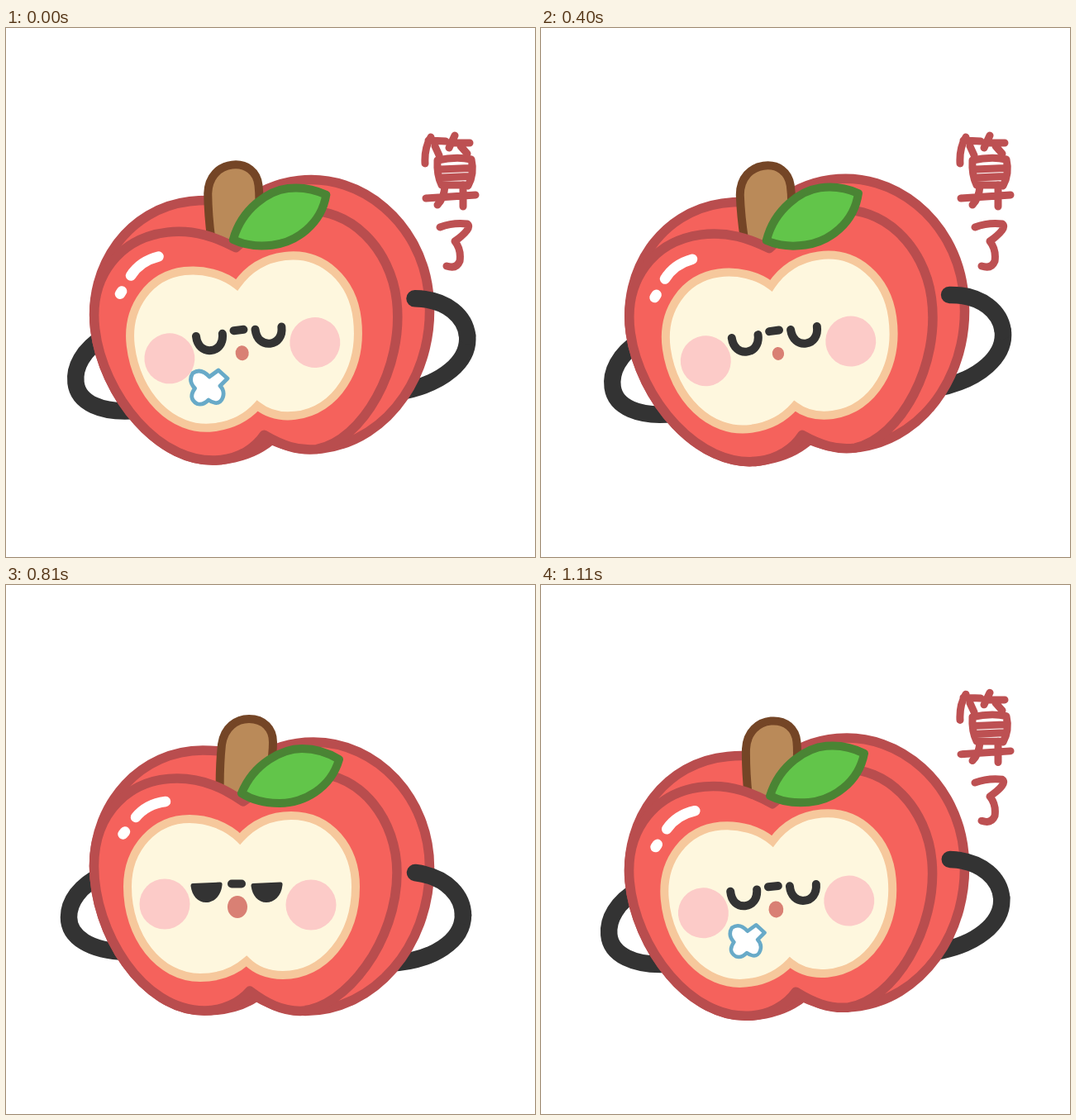
Write an HTML page that moves like this. It is 640 px wide and 640 px high and loops after 1210 ms.

```html
<!DOCTYPE html>
<html lang="zh">
<head>
<meta charset="utf-8">
<title>算了</title>
<style>
  html, body { margin: 0; width: 100%; height: 100%; overflow: hidden; background: #fff; }
  svg { display: block; width: 100%; height: 100%; }
  .line { fill: none; stroke-linecap: round; stroke-linejoin: round; }
  .skin { fill: #f5625c; stroke: #b94d4e; stroke-width: 11.5; stroke-linejoin: round; }
  .arm { stroke: #333; stroke-width: 20.5; }
  .ink { stroke: #333; stroke-width: 10; }
  .shine { stroke: #fff; stroke-width: 12.5; }
  .text { stroke: #bd5052; stroke-width: 9; }
</style>
</head>
<body>
<svg viewBox="0 0 640 640">
  <defs>
    <path id="lid" d="M226 361L259 359.500Q262 359.500 261.500 363C260 377 251 384 242 384C232 384 225 376 223.500 364Q223.500 361 226 361Z" fill="#333"/>
    <path id="shut" class="line ink" d="M227 363C227 375 234 382 243 382C252 382 259 375 259 363.500"/>
  </defs>

  <g id="apple">
    <path class="line arm" d="M118 350C88 364 76 384 76 402C76 426 102 443 146 444"/>
    <path class="line arm" d="M553 399C553 430 518 455 463 458"/>
    <path class="skin" d="M106.500 340C106.500 263 164 200 238 200C262 200 285 205 300 212C320 198 345 190 372 190C449 190 512.500 258 512.500 342C512.500 437 445 515.500 362 515.500C338 515.500 320 508 303 498C287 509 265 515 240 515C165 515 106.500 420 106.500 340Z"/>
    <path d="M259 262C258 230 259 212 261 193C264 172 279 162 294 162C312 162 323 174 323 190C323 210 318 235 310 262Z" fill="#ba8a59" stroke="#744526" stroke-width="10"/>
    <path class="skin" d="M106.500 340C106.500 275 150 234 207 234C240 234 265 247 287 262C310 245 340 228 372 228C430 228 473 285 473 348C473 430 412 512 356 515.500C333 515 315 506 295 491C282 506 262 515 240 515C165 515 106.500 420 106.500 340Z"/>
    <path d="M285 252C300 215 335 198 358 198C375 198 390 203 403 211C393 246 360 264 331 264C311 264 296 259 285 252Z" fill="#62c54a" stroke="#4a8434" stroke-width="10" stroke-linejoin="round"/>
    <path class="line arm" d="M495 348C535 353 553 378 553 400"/>
    <path class="line shine" d="M157 281Q170 265 193 262"/>
    <path class="line shine" d="M141.500 301.500L144 298.500"/>

    <path d="M147 365C147 318 180 283 222 283C245 283 268 292 283 307C300 288 320 279 345 279C392 279 423 318 423 365C423 425 385 472 335 472C318 472 302 466 291 455C275 469 257 475 235 475C185 475 147 425 147 365Z" fill="#fef7de" stroke="#f6c89c" stroke-width="10"/>
    <g fill="#fccbc8">
      <circle cx="192" cy="386" r="30.500"/>
      <circle cx="369" cy="387" r="30.500"/>
    </g>
    <path class="line ink" d="M273 361.500H285"/>
    <g id="sulky"><use href="#lid"/><use href="#lid" x="73"/></g>
    <g id="resigned"><use href="#shut"/><use href="#shut" x="72"/></g>
    <path id="flat" class="line ink" d="M267 387H290"/>
    <ellipse id="mouth" cx="280" cy="389.500" fill="#d98074"/>
  </g>

  <path id="puff" d="M2 -13L13 -21L24 -11L15 -2C23 6 18 20 9 18.500Q4 17.500 1 15Q-6 22 -13 19.500Q-24 13 -15.500 1Q-24 -8 -18 -17.500Q-8 -24 2 -13Z" fill="#fff" stroke="#68aac8" stroke-width="4.800" stroke-linejoin="round"/>

  <g id="sigh" class="line text" role="img" aria-label="算了">
    <path d="M507 164Q506 145 514 132M511 136L532 137M519 143L524 154M543 130L536 145M541 139L561 139M550 143L558 152"/>
    <path d="M522 160Q521 178 527 190M522 160Q545 155 563 159Q567 176 559 191M526 171L560 169.500M527 181L560 179.500M527 190L559 190"/>
    <path d="M508 206L568 202M531 191Q530 206 522 214M553 190L553 216"/>
    <path d="M525 241Q541 235 558 237Q565 242 543 258Q551 268 549 282Q545 292 533 288"/>
  </g>
</svg>
<script>
const LOOP = 1210;
const $ = id => document.getElementById(id);
const show = (id, on) => $(id).setAttribute("visibility", on ? "visible" : "hidden");

// at: ms, tilt: degrees, mouth: height radius (0 = flat), text: 1 or 2, puff: [x, y, scale, opacity]
const poses = [
  { at: 0, tilt: -6.6, mouth: 9, text: 1, puff: [244, 435, 1, 1] },
  { at: 200, tilt: -8, mouth: 8, text: 2, puff: [241, 438, 1.03, 0.7] },
  { at: 270, tilt: -8, mouth: 8, text: 1, puff: [240, 439, 1.04, 0.45] },
  { at: 340, tilt: -8, mouth: 8, text: 2, puff: [239, 440, 1.05, 0.2] },
  { at: 400, tilt: -8, mouth: 8, text: 1 },
  { at: 610, tilt: 2.9, mouth: 0 },
  { at: 680, tilt: 1.4, mouth: 10 },
  { at: 810, tilt: 0, mouth: 13.5 },
  { at: 1010, tilt: -5.1, mouth: 11, text: 1, puff: [250, 425, 0.87, 1] },
  { at: 1080, tilt: -5.1, mouth: 10.5, text: 1, puff: [249, 428, 0.91, 1] },
  { at: 1110, tilt: -5.1, mouth: 10, text: 2, puff: [248, 431, 0.94, 1] }
];

function draw(ms) {
  const { tilt, mouth, text, puff } = poses.findLast(p => p.at <= ms);
  $("apple").setAttribute("transform", `rotate(${tilt} 315 342)`);
  show("sulky", !text);
  show("resigned", text);
  show("flat", !mouth);
  $("mouth").setAttribute("rx", mouth * 0.89);
  $("mouth").setAttribute("ry", mouth);

  show("sigh", text);
  $("sigh").setAttribute("transform", text === 2 ? "translate(0 2.5) scale(1 .982)" : "");

  show("puff", puff);
  if (puff) {
    const [x, y, size, alpha] = puff;
    $("puff").setAttribute("transform", `translate(${x} ${y}) scale(${size})`);
    $("puff").setAttribute("opacity", alpha);
  }
}

const start = performance.now();
function tick() {
  draw((performance.now() - start) % LOOP);
  requestAnimationFrame(tick);
}
tick();
</script>
</body>
</html>
```
